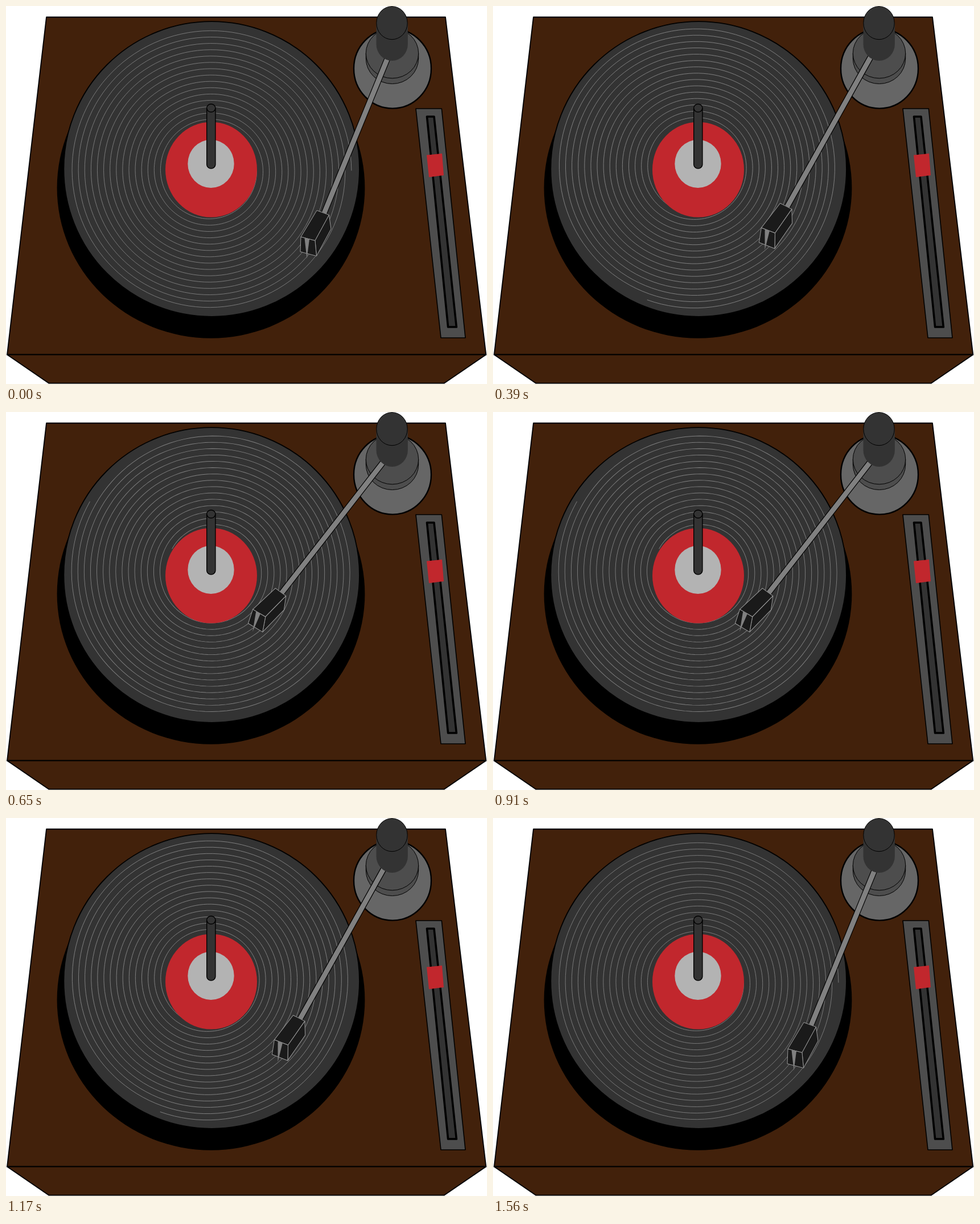
These frames come from a looping animation (845x663 px, 1.69 s). An HTML page:

```html
<!DOCTYPE html>
<html lang="en">
<head>
<meta charset="utf-8">
<title>Turntable</title>
<style>
  html, body { margin: 0; width: 100%; height: 100%; overflow: hidden; background: #fff; }
  svg { display: block; width: 845px; height: 663px; }
</style>
</head>
<body>
<svg viewBox="0 0 845 663" stroke-linejoin="round">
  <!-- cabinet -->
  <g fill="#42210b" stroke="#000" stroke-width="1.8">
    <path d="M71 19.5H772L843.3 611.5H2Z"/>
    <path d="M2 611.5H843.3L770 661.6H75Z"/>
  </g>

  <!-- platter and record -->
  <ellipse cx="360" cy="319" rx="270.4" ry="263.7"/>
  <ellipse cx="361.2" cy="286" rx="259.8" ry="258.8" fill="#333" stroke="#000" stroke-width="1.8"/>
  <path id="groove" fill="none" stroke="#808080" stroke-width="0.9"/>
  <ellipse cx="360.5" cy="287" rx="80.5" ry="83.5" fill="#c1272d"/>
  <ellipse cx="360" cy="276.7" rx="40.7" ry="42.2" fill="#b3b3b3"/>
  <g fill="#333" stroke="#000" stroke-width="1.4">
    <path d="M352.7 179V278A7.6 7 0 0 0 367.9 278V179Z"/>
    <ellipse cx="360.3" cy="179" rx="7.6" ry="7"/>
  </g>

  <!-- pitch slider -->
  <path d="M720 180H765.3L807 582H764Z" fill="#4d4d4d" stroke="#000" stroke-width="1.6"/>
  <path d="M739.5 194H752L791.3 563H776.6Z" fill="#333" stroke="#000" stroke-width="3.6"/>
  <path d="M739 261.5L766 258.7L769 297L743 300.2Z" fill="#c1272d"/>

  <!-- tonearm base -->
  <ellipse cx="679" cy="109.8" rx="68" ry="69.8" fill="#666" stroke="#000" stroke-width="2.4"/>
  <g fill="#4d4d4d" stroke="#000" stroke-width="1">
    <path d="M632.3 83V92A46.2 44.5 0 0 0 724.7 92V83Z"/>
    <ellipse cx="678.5" cy="83" rx="46.2" ry="43.8"/>
  </g>

  <!-- tonearm -->
  <line class="arm" stroke="#000" stroke-width="11"/>
  <line class="arm" stroke="#808080" stroke-width="8.6"/>
  <g id="head" fill="#1a1a1a" stroke="#999" stroke-width="1">
    <path d="M546 358.5L567.5 366.5L543 411.5L518 405Z"/>
    <path d="M567.5 366.5L571 391L545.5 438.5L543 411.5Z"/>
    <path d="M518 405L543 411.5L545.5 438.5L517 431Z"/>
    <path d="M524.5 407L533 409L528.5 443Z" fill="#808080" stroke="none"/>
  </g>
  <path d="M650.5 29.5V67A27.7 29 0 0 0 705.9 67V29.5Z" fill="#333"/>
  <ellipse cx="678" cy="29.7" rx="27.2" ry="29" fill="#333" stroke="#000" stroke-width="1"/>
</svg>
<script>
const STEP = 130, STEPS = 13;
const HUB = { x: 544, y: 398 };        // centre of the cartridge at rest
const JOINT = { x: 15, y: -35 };       // arm joint relative to that centre
const ARM_TOP = 74;

// cartridge dx, dy, turn; arm top x; record turn
const poses = [
  [0, 0, 0, 677.5, 0],
  [-9, -1, 1.2, 676.5, 30],
  [-18, -2.5, 2.5, 675.5, 60.5],
  [-46, -13, 6.5, 672, 110],
  [-66, -31, 11.2, 672.5, 160],
  [-83.5, -51.5, 16, 673.5, 210],
  [-101, -76, 20.5, 674.5, 260]
];

const groove = document.getElementById('groove');
const head = document.getElementById('head');
const arms = document.querySelectorAll('.arm');

function spiral(cx, cy, radius, gap, turns) {
  let d = '';
  for (let a = 0; a <= turns * 360; a += 3) {
    const r = radius - gap * a / 360, t = -a * Math.PI / 180;
    d += (a ? 'L' : 'M') + (cx + r * Math.cos(t)).toFixed(2) + ' ' + (cy + r * Math.sin(t)).toFixed(2);
  }
  return d;
}

function show([dx, dy, turn, topX, spin]) {
  const a = turn * Math.PI / 180, c = Math.cos(a), s = Math.sin(a);
  groove.setAttribute('transform', `rotate(${spin} 359.5 284.4)`);
  head.setAttribute('transform', `translate(${dx} ${dy}) rotate(${turn} ${HUB.x} ${HUB.y})`);
  const ends = {
    x1: topX, y1: ARM_TOP,
    x2: HUB.x + dx + JOINT.x * c - JOINT.y * s,
    y2: HUB.y + dy + JOINT.x * s + JOINT.y * c
  };
  for (const arm of arms)
    for (const k in ends) arm.setAttribute(k, ends[k]);
}

// slightly off centre, so the groove wobbles as it turns
groove.setAttribute('d', spiral(358.7, 288.8, 248.2, 11.1, 15));

const start = performance.now();
function tick() {
  const step = Math.floor((performance.now() - start) / STEP) % STEPS;
  show(poses[Math.min(step, STEPS - 1 - step)]);
  requestAnimationFrame(tick);
}
tick();
</script>
</body>
</html>
```
